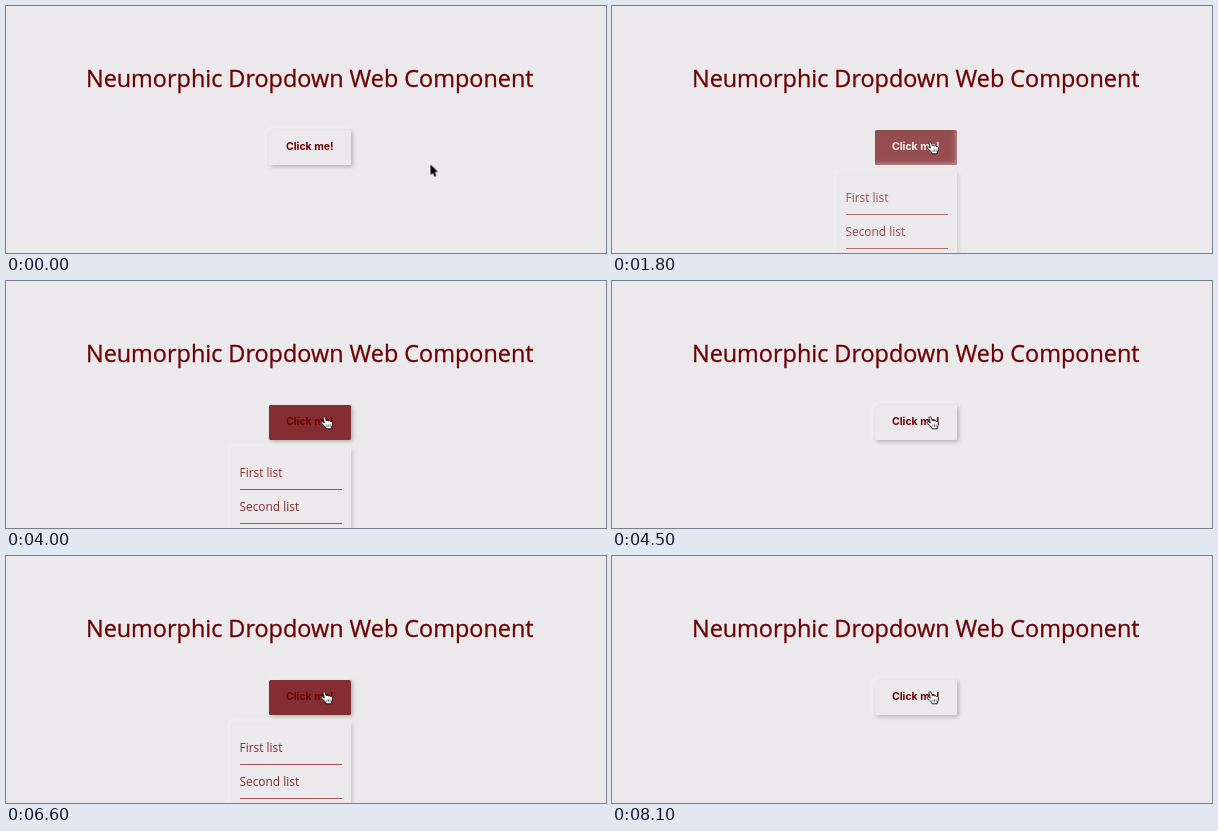
Write an HTML page that moves like this. It is 600x247 px and loops after 8500 ms.

```html
<!DOCTYPE html>
<html lang="en">
<head>
<meta charset="utf-8">
<title>Neumorphic Dropdown</title>
<style>
  :root { --bg: #ebe9eb; --red: #6c0003; --loop: 8.5s step-end infinite; }
  html, body { margin: 0; width: 100%; height: 100%; overflow: hidden; background: var(--bg); }
  body { position: relative; font-family: "Open Sans", "Noto Sans", sans-serif; color: var(--red); }
  body *, .button::before { position: absolute; box-sizing: border-box; margin: 0; white-space: nowrap; }
  h1 {
    left: 0; top: 57px; width: 607.5px; text-align: center;
    font-size: 23.4px; font-weight: 400; line-height: 30px;
    -webkit-text-stroke: .3px var(--red);
  }

  .button {
    left: 263px; top: 124px; width: 81.5px; height: 34.5px; border-radius: 1.5px;
    font: 700 10.5px/34.5px Inter, sans-serif; text-align: center;
    background: var(--bg); animation: press var(--loop);
  }
  .button::before {
    content: ""; inset: 0; border-radius: inherit;
    background: var(--red); animation: fade var(--loop);
  }
  .button span { inset: 0; border-radius: inherit; animation: sink var(--loop); }

  .menu {
    left: 225px; top: 166px; width: 119.5px; height: 120px; border-radius: 1.5px;
    box-shadow: 1.5px 1.5px 4px #0003, -1.5px -1.5px 4px #fffa;
    background: var(--bg); animation: fade var(--loop);
  }
  .menu p {
    left: 8.5px; top: 15.2px; width: 102.5px; height: 27.8px;
    font-size: 11.9px; line-height: 20px; border-bottom: 1px solid #942c30;
  }
  .menu p + p { top: 49px; }

  svg { left: 0; top: 0; overflow: visible; }
  .arrow { animation: travel var(--loop); }
  .hand { transform: translate(314px, 135px); animation: point var(--loop); }

  @keyframes fade {
    0% { opacity: 0; }
    20% { opacity: .22; } 21.17% { opacity: .67; } 22.35% { opacity: .9; } 23.52% { opacity: .97; } 24.7% { opacity: 1; }
    47.05% { opacity: .8; } 48.23% { opacity: .35; } 49.41% { opacity: .12; } 50.58% { opacity: .03; } 51.76% { opacity: 0; }
    62.35% { opacity: .22; } 63.52% { opacity: .67; } 64.7% { opacity: .9; } 65.88% { opacity: .97; } 67.05% { opacity: 1; }
    77.64% { opacity: .8; } 78.82% { opacity: .35; } 80% { opacity: .12; } 81.17% { opacity: .03; } 82.35%, 100% { opacity: 0; }
  }
  @keyframes press {
    0%, 47.05%, 77.64%, 100% { color: var(--red); box-shadow: 1.5px 1.5px 4px #0004, -1.5px -1.5px 4px #fffa; }
    20%, 62.35% { color: #f3efef; box-shadow: none; }
  }
  @keyframes sink {
    0%, 47.05%, 77.64%, 100% { box-shadow: none; }
    20%, 62.35% { box-shadow: inset 1px 1px 3px #0003, inset -1.5px -1.5px 4px #fff6; }
  }
  @keyframes travel {
    0% { transform: translate(424.5px, 158.5px); }
    9.41% { transform: translate(396px, 152px); }
    10.58% { transform: translate(346px, 143px); }
    11.76%, 100% { transform: translate(346px, 143px); visibility: hidden; }
  }
  @keyframes point {
    0% { visibility: hidden; }
    11.76%, 100% { visibility: visible; }
  }
</style>
</head>
<body>
  <h1>Neumorphic Dropdown Web Component</h1>
  <div class="button"><span>Click me!</span></div>
  <div class="menu"><p>First list</p><p>Second list</p></div>

  <svg class="arrow" width="9" height="14">
    <path d="M0 0V10.6L2.4 8.4 4 12.2 5.9 11.4 4.3 7.6H7.6Z" fill="#000" stroke="#fff" stroke-width="1.2" paint-order="stroke"/>
  </svg>
  <svg class="hand" width="14" height="14">
    <path d="M3.1 2.1C2.7.6 4.7.1 5.2 1.6L6.3 5C6.8 4 8.2 4.2 8.5 5.1 9 4.4 10.3 4.6 10.5 5.6 11.3 5 12.3 5.6 12.4 6.6 12.6 8.8 12.1 9.8 11.4 11V12.8H6V11.6C4.5 10.2 3 8.5 1.4 7.3.5 6.3 1.9 5.4 2.9 6.1L4.3 7.1Z"
      fill="#fff" stroke="#111" stroke-width=".9" stroke-linejoin="round"/>
    <path d="M7 8.4V10.8M8.6 8.4V10.8M10.2 8.4V10.8" stroke="#111" stroke-width=".6"/>
  </svg>
</body>
</html>
```
